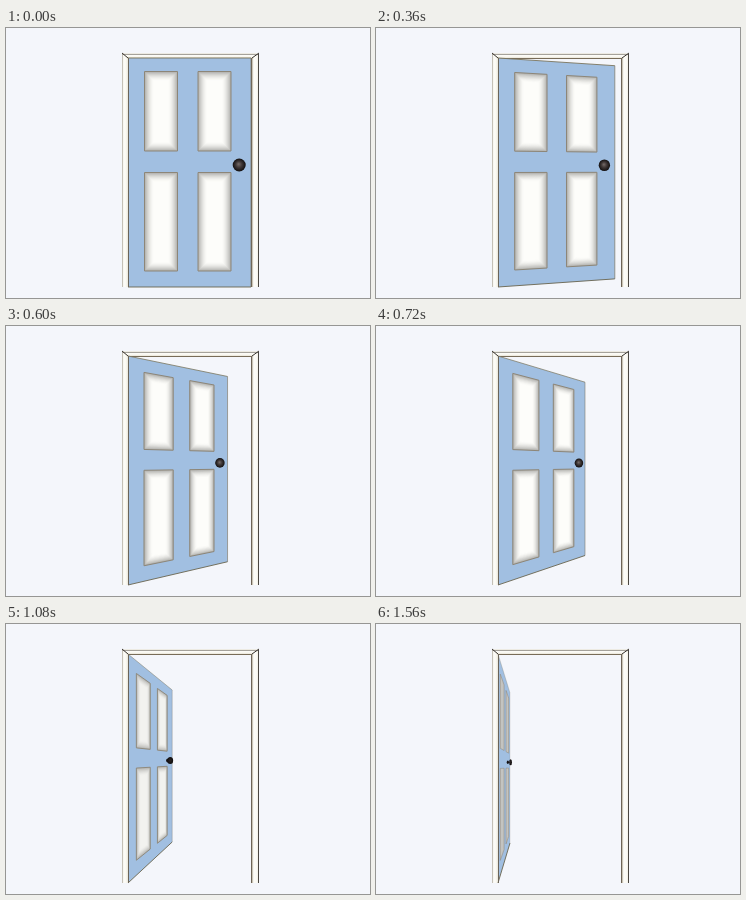
These frames come from a looping animation (364 by 270 pixels, 2220 ms). An HTML page with a canvas:

```html
<!DOCTYPE html>
<html lang="en">
<head>
<meta charset="utf-8">
<title>Opening door</title>
<style>
  html, body { margin: 0; width: 100%; height: 100%; overflow: hidden; background: #f4f6fb; }
  canvas { display: block; width: 364px; height: 270px; }
</style>
</head>
<body>
<canvas id="stage" width="364" height="270"></canvas>
<script>
const ctx = document.getElementById('stage').getContext('2d');
const LOOP = 2220, STEP = 60, LAST = 26;
const DOOR = { x: 122, y: 30, w: 123, h: 229 };

// Pose by step: visible width, far top, far bottom, knob radii.
const poses = [
  [0, 123, 30, 259, 6.5, 6.5],
  [4, 121.2, 32.6, 257.3, 6.1, 6.3],
  [8, 109.8, 44, 243, 5.2, 5.3],
  [12, 87, 56.2, 229.5, 4.2, 4.5],
  [18, 44.2, 66, 218, 2.9, 3.5],
  [22, 20, 66.8, 219, 2, 3.2],
  [26, 12, 69, 219, 1.4, 3]
];

// Smooth curve through the poses.
function poseAt(step) {
  let i = 0;
  while (i < poses.length - 2 && step > poses[i + 1][0]) i++;
  const a = poses[i], b = poses[i + 1], span = b[0] - a[0];
  const before = poses[Math.max(i - 1, 0)];
  const after = poses[Math.min(i + 2, poses.length - 1)];
  const t = (step - a[0]) / span, t2 = t * t, t3 = t2 * t;
  return a.slice(1).map((p, k) => {
    const q = b[k + 1];
    const m0 = (q - before[k + 1]) / (b[0] - before[0]) * span;
    const m1 = (after[k + 1] - p) / (after[0] - a[0]) * span;
    return (2 * t3 - 3 * t2 + 1) * p + (t3 - 2 * t2 + t) * m0 +
           (3 * t2 - 2 * t3) * q + (t3 - t2) * m1;
  });
}

// Maps a point of the closed door onto the swung door.
function projector([width, top, bottom]) {
  const stretch = DOOR.h / (bottom - top);
  return (x, y) => {
    const u = (x - DOOR.x) / DOOR.w, v = (y - DOOR.y) / DOOR.h;
    const d = u * stretch / (1 + u * (stretch - 1));
    const y0 = DOOR.y + d * (top - DOOR.y);
    const y1 = DOOR.y + DOOR.h + d * (bottom - DOOR.y - DOOR.h);
    return [DOOR.x + d * width, y0 + v * (y1 - y0)];
  };
}

function polygon(points, fill, stroke) {
  ctx.beginPath();
  points.forEach(p => ctx.lineTo(...p));
  ctx.closePath();
  if (fill) { ctx.fillStyle = fill; ctx.fill(); }
  if (stroke) { ctx.strokeStyle = stroke; ctx.lineWidth = 1; ctx.stroke(); }
}

function line(x0, y0, x1, y1, color) {
  ctx.beginPath();
  ctx.moveTo(x0, y0);
  ctx.lineTo(x1, y1);
  ctx.strokeStyle = color;
  ctx.lineWidth = 1;
  ctx.stroke();
}

function shade(x0, y0, x1, y1, ...colors) {
  const g = ctx.createLinearGradient(x0, y0, x1, y1);
  colors.forEach((c, i) => g.addColorStop(i / (colors.length - 1), c));
  return g;
}

function drawFrame() {
  const jamb = ['#e6e3da', '#fdfdf9', '#fbfaf4', '#e9e5d8'];
  polygon([[116, 25], [122, 30], [122, 259], [116, 259]], shade(116, 0, 122, 0, ...jamb));
  polygon([[253, 25], [246, 30], [246, 259], [253, 259]], shade(246, 0, 253, 0, ...jamb));
  polygon([[116, 25], [253, 25], [246, 30], [122, 30]], shade(0, 25, 0, 30, ...jamb));
  line(116.5, 26, 116.5, 259, '#c4c0b6');
  line(122.5, 30, 122.5, 259, '#6a645a');
  line(116, 26.5, 253, 26.5, '#a5a29b');
  line(122, 30.5, 246, 30.5, '#786c58');
  line(245.5, 30, 245.5, 259, '#6d6456');
  line(246.5, 30, 246.5, 259, '#cbc5b6');
  line(252.5, 26, 252.5, 259, '#4a4742');
  line(116, 25, 122, 30, '#37322d');
  line(253, 25, 246, 30, '#37322d');
}

// Panels turn grey as the door comes edge-on.
function drawPanel(project, greyness, x0, y0, x1, y1) {
  const inset = n => [[x0 + n, y0 + n], [x1 - n, y0 + n], [x1 - n, y1 - n], [x0 + n, y1 - n]]
    .map(p => project(...p));
  const rings = 9;
  for (let i = 0; i <= rings; i++) {
    const k = 1 - (1 - i / rings) ** 1.7;
    const light = 178 + 75 * k;
    const c = Math.round(light + (196 - light) * greyness);
    polygon(inset(i), `rgb(${c},${c},${c - 3})`);
  }
  polygon(inset(0), null, `rgba(141,134,120,${1 - 0.5 * greyness})`);
}

function drawKnob([x, y], rx, ry, open) {
  const ball = x + 1.5 * open, base = y - 0.7 * open;
  ctx.fillStyle = '#151112';
  ctx.beginPath();
  ctx.ellipse(x - 1.5 * open, base, rx * 0.8, ry * 0.6, 0, 0, Math.PI * 2);
  ctx.fill();
  ctx.save();
  ctx.translate(ball, base);
  ctx.scale(rx, ry);
  const g = ctx.createRadialGradient(-0.1, -0.15, 0, 0, 0, 1);
  g.addColorStop(0, open > 0.5 ? '#2a2424' : '#766c6a');
  g.addColorStop(0.45, open > 0.5 ? '#1d1919' : '#423a39');
  g.addColorStop(1, '#110e0f');
  ctx.fillStyle = g;
  ctx.beginPath();
  ctx.arc(0, 0, 1, 0, Math.PI * 2);
  ctx.fill();
  ctx.restore();
}

function drawDoor(step) {
  const pose = poseAt(step), project = projector(pose);
  const { x, y, w, h } = DOOR;
  const open = 1 - pose[0] / w;
  const greyness = Math.min(1, Math.max(0, (open - 0.6) / 0.22));
  const [topLeft, topRight, bottomRight, bottomLeft] =
    [[x, y], [x + w, y], [x + w, y + h], [x, y + h]].map(p => project(...p));
  polygon([topLeft, topRight, bottomRight, bottomLeft], '#a1bfe1');
  line(...topLeft, ...topRight, `rgba(120,114,88,${0.9 - 0.7 * open})`);
  line(...topRight, ...bottomRight, `rgba(120,112,92,${0.7 - 0.6 * open})`);
  line(...bottomLeft, ...bottomRight, 'rgba(100,94,70,0.85)');
  line(x + 0.5, y, x + 0.5, y + h, '#6a645a');
  for (const left of [138.5, 192]) {
    drawPanel(project, greyness, left, 43.5, left + 33, 123);
    drawPanel(project, greyness, left, 144.5, left + 33, 243);
  }
  drawKnob(project(233.2, 137), pose[3], pose[4], open);
}

function render(now) {
  const step = Math.min(LAST, Math.floor(now % LOOP / STEP));
  ctx.fillStyle = '#f4f6fb';
  ctx.fillRect(0, 0, 364, 270);
  drawFrame();
  drawDoor(step);
}

const start = performance.now();
function tick() {
  render(performance.now() - start);
  requestAnimationFrame(tick);
}
tick();
</script>
</body>
</html>
```
